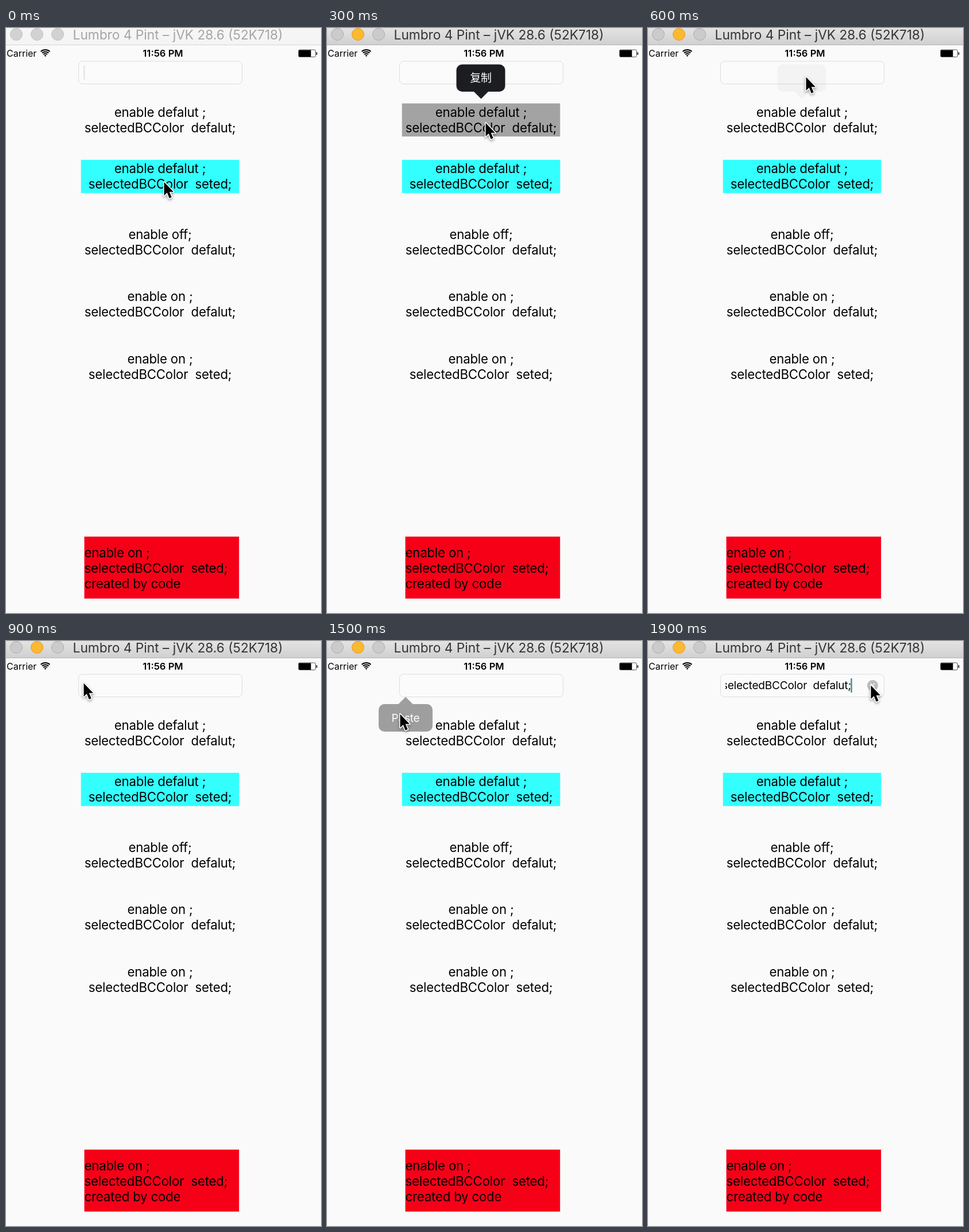
An HTML page with a canvas for the animation above (2 s loop, 549 px wide and 1020 px high).

```html
<!DOCTYPE html>
<html lang="en">
<head>
<meta charset="utf-8">
<title>Label copy and paste</title>
<style>
  html, body { margin: 0; width: 100%; height: 100%; overflow: hidden; background: #fafafa; }
  canvas { display: block; }
</style>
</head>
<body>
<canvas id="stage" width="549" height="1020"></canvas>
<script>
const ctx = document.getElementById('stage').getContext('2d');
const LOOP = 2000, STEP = 100;
const CENTER = 268.5;
const SANS = 'Inter, "Noto Sans CJK SC", "Noto Sans CJK", sans-serif';
const DARK = '#1c1d20';

const labels = [
  { y: 155, lines: ['enable defalut ;', 'selectedBCColor  defalut;'] },
  { y: 253, lines: ['enable defalut ;', 'selectedBCColor  seted;'] },
  { y: 368, lines: ['enable off;', 'selectedBCColor  defalut;'] },
  { y: 475.5, lines: ['enable on ;', 'selectedBCColor  defalut;'] },
  { y: 585, lines: ['enable on ;', 'selectedBCColor  seted;'] },
  { y: 922.5, left: 136.5, lines: ['enable on ;', 'selectedBCColor  seted;', 'created by code'] }
];

// time, x, y of the pointer tip
const pointerPath = [
  [0, 275, 268], [300, 276, 165], [400, 276, 165], [600, 275, 85],
  [900, 135, 73], [1300, 133, 70], [1500, 127, 127], [1600, 127, 127],
  [1900, 388, 77], [2000, 388, 77]
];

function pointerAt(t) {
  const i = pointerPath.findIndex(key => key[0] > t);
  const [t0, x0, y0] = pointerPath[i - 1], [t1, x1, y1] = pointerPath[i];
  const k = (t - t0) / (t1 - t0);
  return [x0 + (x1 - x0) * k, y0 + (y1 - y0) * k];
}

function rect(x, y, w, h, color) {
  ctx.fillStyle = color;
  ctx.fillRect(x, y, w, h);
}

function rounded(x, y, w, h, r, fill, stroke) {
  ctx.beginPath();
  ctx.roundRect(x, y, w, h, r);
  if (fill) { ctx.fillStyle = fill; ctx.fill(); }
  if (stroke) { ctx.strokeStyle = stroke; ctx.lineWidth = 1; ctx.stroke(); }
}

function circle(x, y, r, fill, stroke) {
  ctx.beginPath();
  ctx.arc(x, y, r, 0, Math.PI * 2);
  ctx.fillStyle = fill;
  ctx.fill();
  if (stroke) { ctx.strokeStyle = stroke; ctx.lineWidth = 1; ctx.stroke(); }
}

function text(str, x, y, size, { align = 'left', color = '#000', weight = 400, spacing = 0 } = {}) {
  ctx.font = `${weight} ${size}px ${SANS}`;
  ctx.letterSpacing = spacing + 'px';
  ctx.textAlign = align;
  ctx.fillStyle = color;
  ctx.fillText(str, x, y);
}

function titleBar(active) {
  const g = ctx.createLinearGradient(0, 0, 0, 29);
  g.addColorStop(0, active ? '#e3e3e3' : '#f6f6f6');
  g.addColorStop(1, active ? '#d0d0d0' : '#f4f4f4');
  rect(0, 0, 549, 29, g);
  rect(0, 29, 549, 1, active ? '#b4b4b4' : '#d4d4d4');
  [18, 54, 90].forEach((x, i) => {
    const lit = active && i === 1;
    circle(x, 11, 10.5, lit ? '#fdb831' : active ? '#cbcbcb' : '#d2d2d2',
      lit ? '#dc9f2c' : active ? '#aeaeae' : '#c2c2c2');
  });
  text('Lumbro 4 Pint – jVK 28.6 (52K718)', 299.5, 20, 22.7,
    { align: 'center', color: active ? '#343434' : '#a5a5a5' });
}

function wifi(x, y) {
  const from = -Math.PI * 0.73, to = -Math.PI * 0.27;
  ctx.strokeStyle = '#000';
  ctx.lineWidth = 2;
  [5.2, 8.6, 12].forEach(r => {
    ctx.beginPath();
    ctx.arc(x, y, r, from, to);
    ctx.stroke();
  });
  ctx.beginPath();
  ctx.moveTo(x, y);
  ctx.arc(x, y, 2.8, from, to);
  ctx.fillStyle = '#000';
  ctx.fill();
}

function statusBar() {
  text('Carrier', 1, 50, 16);
  wifi(68.5, 50);
  text('11:56 PM', 273.5, 50, 16.6, { align: 'center', weight: 600 });
  rounded(510, 38, 29.5, 12.5, 2, '#fff', '#555');
  rect(510, 38.5, 21.5, 11.5, '#000');
  rounded(540.5, 42, 2, 5, 1, '#333');
}

function drawLabels(selected) {
  if (selected) rect(130.7, 131.5, 275.6, 57.7, '#a3a3a3');
  rect(130.7, 229.8, 275.6, 58, '#33ffff');
  rect(136.5, 886.8, 269.7, 108, '#f60018');
  for (const { y, left, lines } of labels)
    lines.forEach((line, i) => text(line, left ?? CENTER, y + i * 27, 22.2,
      { align: left ? 'left' : 'center', spacing: -0.18 }));
}

function caret(x, y, h, color) {
  rounded(x, y, 2.6, h, 1, color);
}

function field(pasted) {
  rounded(126.5, 58, 285, 39.5, 7, '#fbfbfb', '#dcdcdc');
  if (!pasted) return;
  ctx.save();
  ctx.beginPath();
  ctx.rect(135, 59, 240, 38);
  ctx.clip();
  text('selectedBCColor  defalut;', 354, 84, 19, { align: 'right', spacing: -0.18 });
  ctx.restore();
  caret(353.2, 65, 25, '#4a9298');
  circle(391.5, 77.5, 9.5, '#bdbdbd');
  ctx.strokeStyle = '#fff';
  ctx.lineWidth = 1.5;
  ctx.beginPath();
  ctx.moveTo(388, 74); ctx.lineTo(395, 81);
  ctx.moveTo(395, 74); ctx.lineTo(388, 81);
  ctx.stroke();
}

function bubble(str, x, y, w, h, tipX, tipY, color) {
  const base = tipY > y ? y + h : y;
  ctx.beginPath();
  ctx.roundRect(x, y, w, h, 10);
  ctx.fillStyle = color;
  ctx.fill();
  ctx.beginPath();
  ctx.moveTo(tipX - 12.5, base);
  ctx.lineTo(tipX, tipY);
  ctx.lineTo(tipX + 12.5, base);
  ctx.fill();
  text(str, x + w / 2, y + h / 2 + 7, 19, { align: 'center', color: '#fff', spacing: -0.2 });
}

function loupe() {
  const x = 133.5, y = 43, r = 76.5;
  ctx.save();
  ctx.beginPath();
  ctx.rect(0, 30, 549, 200);
  ctx.clip();
  const g = ctx.createRadialGradient(x, y, 25, x, y, r);
  g.addColorStop(0, '#f9f9f9');
  g.addColorStop(0.55, '#f3f3f3');
  g.addColorStop(0.85, '#e6e6e6');
  g.addColorStop(1, '#d6d6d6');
  ctx.shadowColor = 'rgba(0,0,0,.15)';
  ctx.shadowBlur = 3;
  ctx.shadowOffsetY = 1;
  circle(x, y, r, g);
  ctx.shadowColor = 'transparent';
  ctx.beginPath();
  ctx.arc(x, y, r, 0, Math.PI * 2);
  ctx.strokeStyle = '#a4a4a4';
  ctx.lineWidth = 1.4;
  ctx.stroke();
  ctx.clip();
  rounded(121.5, 55.5, 310, 46.5, 8, null, '#d2d2d2');
  rect(58, 34, 4, 3, '#222');
  ctx.restore();
  caret(132.5, 63, 25, '#4a868c');
}

function pointer(x, y) {
  ctx.save();
  ctx.translate(x + 0.5, y + 0.5);
  ctx.scale(0.94, 0.94);
  ctx.beginPath();
  ctx.moveTo(0, 0);
  ctx.lineTo(0, 25);
  ctx.lineTo(5.6, 19.8);
  ctx.lineTo(9.8, 30);
  ctx.lineTo(14, 28.2);
  ctx.lineTo(9.8, 18.3);
  ctx.lineTo(17.5, 18.3);
  ctx.closePath();
  ctx.lineJoin = 'round';
  ctx.shadowColor = 'rgba(0,0,0,.4)';
  ctx.shadowBlur = 4;
  ctx.shadowOffsetY = 2;
  ctx.strokeStyle = '#fff';
  ctx.lineWidth = 3.4;
  ctx.stroke();
  ctx.shadowColor = 'transparent';
  ctx.fillStyle = '#000';
  ctx.fill();
  ctx.restore();
}

function draw(t) {
  const during = (from, to) => t >= from && t < to;
  rect(0, 0, 549, 1020, '#fafafa');
  titleBar(t >= 100);
  statusBar();
  field(t >= 1600);
  if (t < 100) caret(135, 65, 25, '#e6e6e6');
  drawLabels(during(200, 600));

  if (during(200, 700)) {
    ctx.globalAlpha = t < 600 ? 1 : 0.035;
    bubble('复制', 225.5, 63.5, 85, 47.5, CENTER, 123.5, DARK);
    ctx.globalAlpha = 1;
  }
  if (during(1100, 1400)) loupe();
  if (during(1400, 1600))
    bubble('Paste', 90, 110, 94, 48, 137, 97.5, t < 1500 ? DARK : '#9e9e9e');
  pointer(...pointerAt(t));
}

function tick(now) {
  draw(Math.floor((now % LOOP) / STEP) * STEP);
  requestAnimationFrame(tick);
}
requestAnimationFrame(tick);
</script>
</body>
</html>
```
